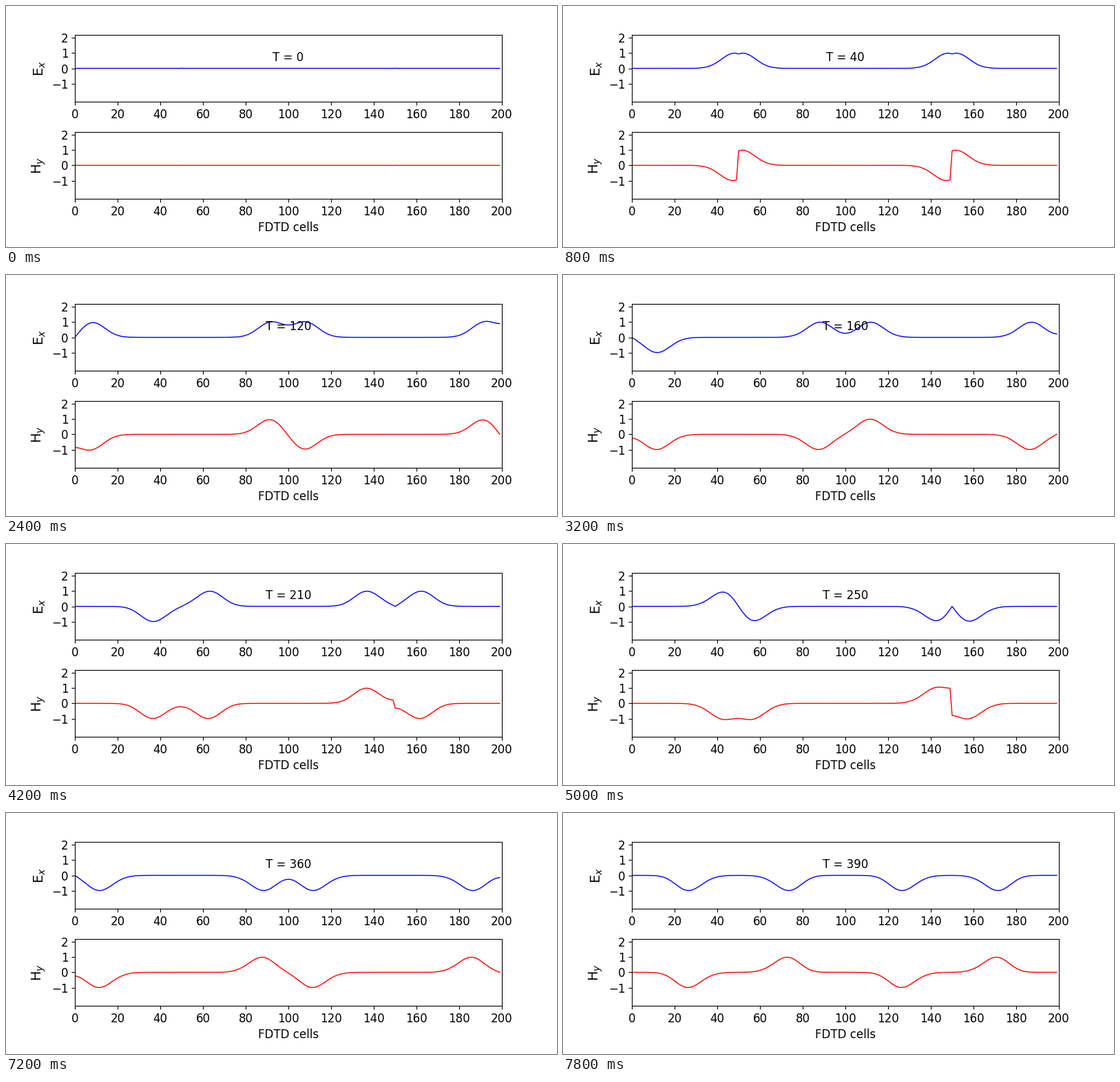
These frames come from a looping animation (800 px wide and 350 px high, 8 s). A matplotlib script:

```python
import numpy as np
import matplotlib.pyplot as plt
from matplotlib.animation import FuncAnimation

CELLS = 200
SOURCES = [50, 150]
SPREAD = 12
T0 = 3 * SPREAD
FRAMES = 40
STRIDE = 10


def simulate():
    """Run the 1D FDTD scheme and keep every STRIDE-th state."""
    ex = np.zeros(CELLS)
    hy = np.zeros(CELLS)
    states = []
    for t in range((FRAMES - 1) * STRIDE + 1):
        ex[1:] += 0.5 * (hy[:-1] - hy[1:])
        ex[SOURCES] = np.exp(-0.5 * ((T0 - t) / SPREAD) ** 2)
        hy[:-1] += 0.5 * (ex[:-1] - ex[1:])
        if t % STRIDE == 0:
            states.append((ex.copy(), hy.copy()))
    return states


def make_axes(row, label, color):
    ax = fig.add_subplot(2, 1, row)
    line, = ax.plot(np.zeros(CELLS), color=color, linewidth=1)
    ax.set_ylabel(label, fontsize=14)
    ax.set_xticks(np.arange(0, 201, 20))
    ax.set_xlim(0, 200)
    ax.set_yticks(np.arange(-1, 3))
    ax.set_ylim(-2.2, 2.2)
    return ax, line


plt.rcParams["font.family"] = "DejaVu Sans"
plt.rcParams["font.size"] = 12
fig = plt.figure(figsize=(8, 3.5), dpi=100)
fig.subplots_adjust(left=0.125, right=0.9, top=0.88, bottom=0.2, hspace=0.45)

ax_e, line_e = make_axes(1, "E$_x$", "blue")
ax_h, line_h = make_axes(2, "H$_y$", "red")
ax_h.set_xlabel("FDTD cells")
clock = ax_e.text(100, 0.5, "T = 0", ha="center")

states = simulate()


def update(i):
    ex, hy = states[i]
    line_e.set_ydata(ex)
    line_h.set_ydata(hy)
    clock.set_text(f"T = {i * STRIDE}")
    return line_e, line_h, clock


anim = FuncAnimation(fig, update, frames=FRAMES, interval=200,
                     repeat=True, repeat_delay=0)
plt.show()
```
